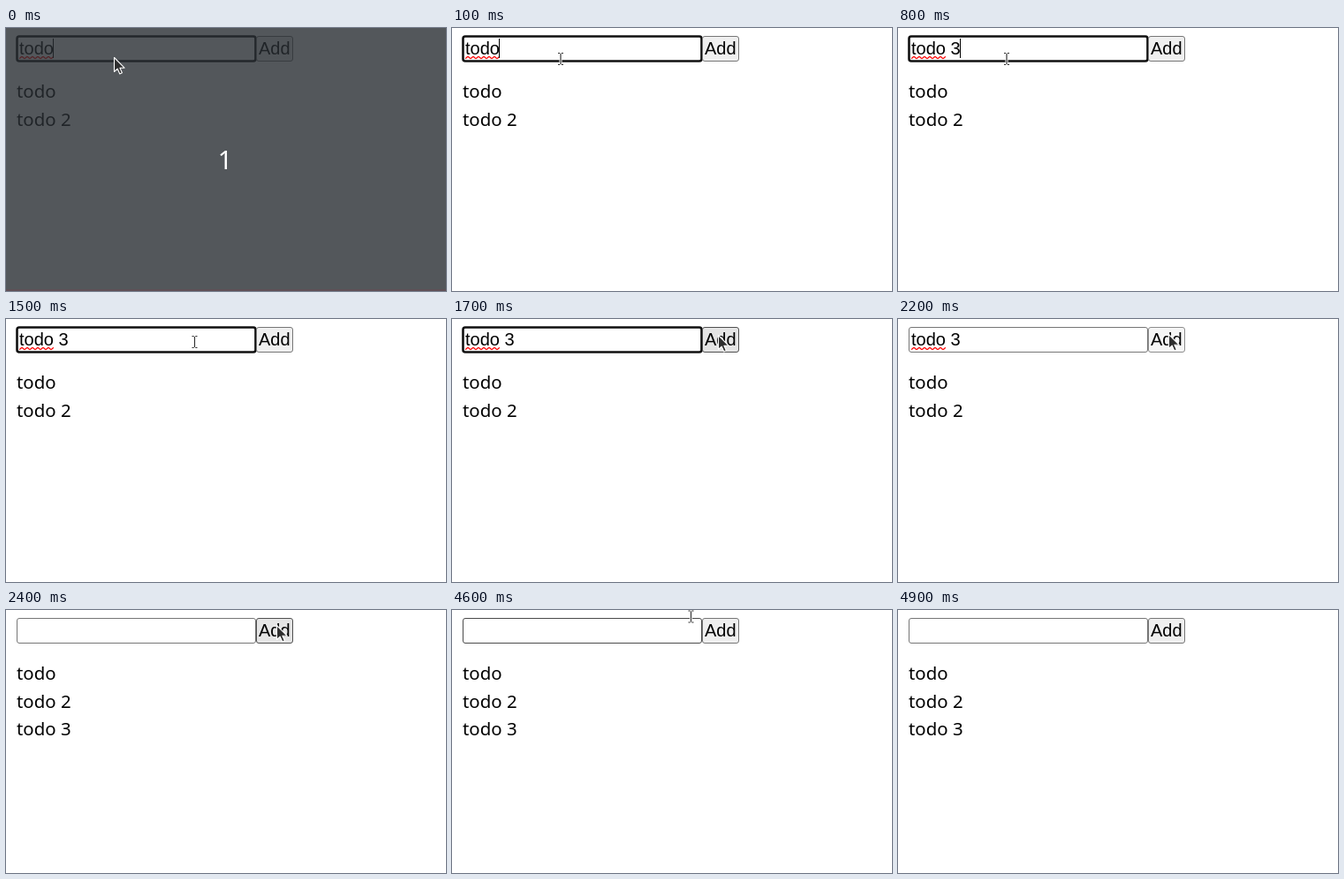
These frames come from a looping animation (498 by 298 pixels, 5.4 s). An HTML page:

```html
<!DOCTYPE html>
<html lang="en">
<head>
<meta charset="utf-8">
<title>Todo list</title>
<style>
  html, body { margin: 0; width: 100%; height: 100%; overflow: hidden; background: #fff; }
  svg { display: block; width: 498px; height: 298px; }
  text { white-space: pre; }
  .ui { font: 20px "Liberation Sans", Arial, sans-serif; }
  .list { font: 20.4px "Noto Sans", "Open Sans", sans-serif; }
  .count { font: 29px "Noto Sans", "Open Sans", sans-serif; fill: #fff; }
</style>
</head>
<body>
<svg viewBox="0 0 498 298">
  <rect id="field" x="12.5" y="9.5" width="270" height="28" rx="2.5" fill="#fff"/>
  <rect id="button" x="283.5" y="9.5" width="41" height="28" rx="2.5"/>
  <g class="ui">
    <text id="value" x="15" y="30"></text>
    <text x="286" y="30">Add</text>
  </g>
  <path id="wave" fill="none" stroke="#f00" stroke-width="1.3"/>
  <rect id="caret" y="12" width="1" height="22"/>
  <g class="list">
    <text x="12" y="79">todo</text>
    <text x="12" y="111">todo 2</text>
    <text id="third" x="12" y="142">todo 3</text>
  </g>
  <g id="overlay">
    <rect width="498" height="298" fill="#292d33" fill-opacity=".8"/>
    <rect y="296" width="498" height="2" fill="#5f4f56"/>
    <text class="count" x="248" y="160" text-anchor="middle">1</text>
  </g>
  <path id="arrow" d="M.5 .5V16.5L4.2 13.2L6.8 19L9.4 17.8L6.9 12.2H12Z"
        fill="#2e2e2e" stroke="#fff" stroke-width="1.1" stroke-linejoin="round"/>
  <g id="beam" fill="none">
    <path d="M-3 -6.5H3M0 -6.5V6.5M-3 6.5H3" stroke="#fff" stroke-width="3"/>
    <path d="M-3 -6.5H-.8M.8 -6.5H3M0 -6V6M-3 6.5H-.8M.8 6.5H3" stroke="#333" stroke-width="1.2"/>
  </g>
</svg>
<script>
const LOOP = 5400;
const $ = id => document.getElementById(id);

const fields = {
  focus: ['#101010', 2.6],
  plain: ['#767676', 1],
  hover: ['#4a4a4a', 1]
};
const buttons = {
  plain: ['#efefef', '#767676'],
  hover: ['#e5e5e5', '#4f4f4f'],
  active: ['#f5f5f5', '#8d8d8d']
};

// Each step changes only the listed properties.
const steps = [
  [0, { value: 'todo', caret: 53, field: 'focus', button: 'plain', third: false,
        overlay: true, cursor: ['arrow', 122, 33] }],
  [100, { overlay: false, cursor: ['beam', 123, 35] }],
  [400, { value: 'todo ', caret: 59 }],
  [800, { value: 'todo 3', caret: 70 }],
  [1500, { caret: null, cursor: ['beam', 213.5, 26] }],
  [1600, { cursor: ['beam', 267, 21] }],
  [1700, { cursor: ['arrow', 301, 18], button: 'hover' }],
  [1800, { cursor: ['arrow', 306, 17] }],
  [2100, { caret: 70 }],
  [2200, { caret: null, field: 'plain', button: 'active' }],
  [2400, { value: '', third: true, button: 'hover' }],
  [4600, { cursor: ['beam', 270.5, 7.5], field: 'hover', button: 'plain' }],
  [4700, { cursor: ['arrow', 265, -7], field: 'plain' }],
  [4800, { cursor: ['arrow', 262, -15] }],
  [4900, { cursor: null }]
];

let wave = 'M15 34.5';
for (let x = 16; x <= 54; x++) {
  wave += `L${x} ${(33.5 + Math.cos((x - 15) * Math.PI / 3)).toFixed(2)}`;
}
$('wave').setAttribute('d', wave);

function attrs(id, values) {
  for (const key in values) $(id).setAttribute(key, values[key]);
}

function show(id, on) {
  $(id).style.display = on ? '' : 'none';
}

function render(state) {
  const [edge, weight] = fields[state.field];
  const [fill, border] = buttons[state.button];
  attrs('field', { stroke: edge, 'stroke-width': weight });
  attrs('button', { fill, stroke: border });
  $('value').textContent = state.value;
  show('wave', state.value);
  show('third', state.third);
  show('overlay', state.overlay);
  show('caret', state.caret !== null);
  if (state.caret !== null) attrs('caret', { x: state.caret });
  const [kind, x, y] = state.cursor || [];
  for (const id of ['arrow', 'beam']) show(id, id === kind);
  if (kind) attrs(kind, { transform: `translate(${x} ${y})` });
}

const start = performance.now();
let last = -1;

function tick() {
  const time = (performance.now() - start) % LOOP;
  const count = steps.filter(step => step[0] <= time).length;
  if (count !== last) {
    last = count;
    render(Object.assign({}, ...steps.slice(0, count).map(step => step[1])));
  }
  requestAnimationFrame(tick);
}
tick();
</script>
</body>
</html>
```
